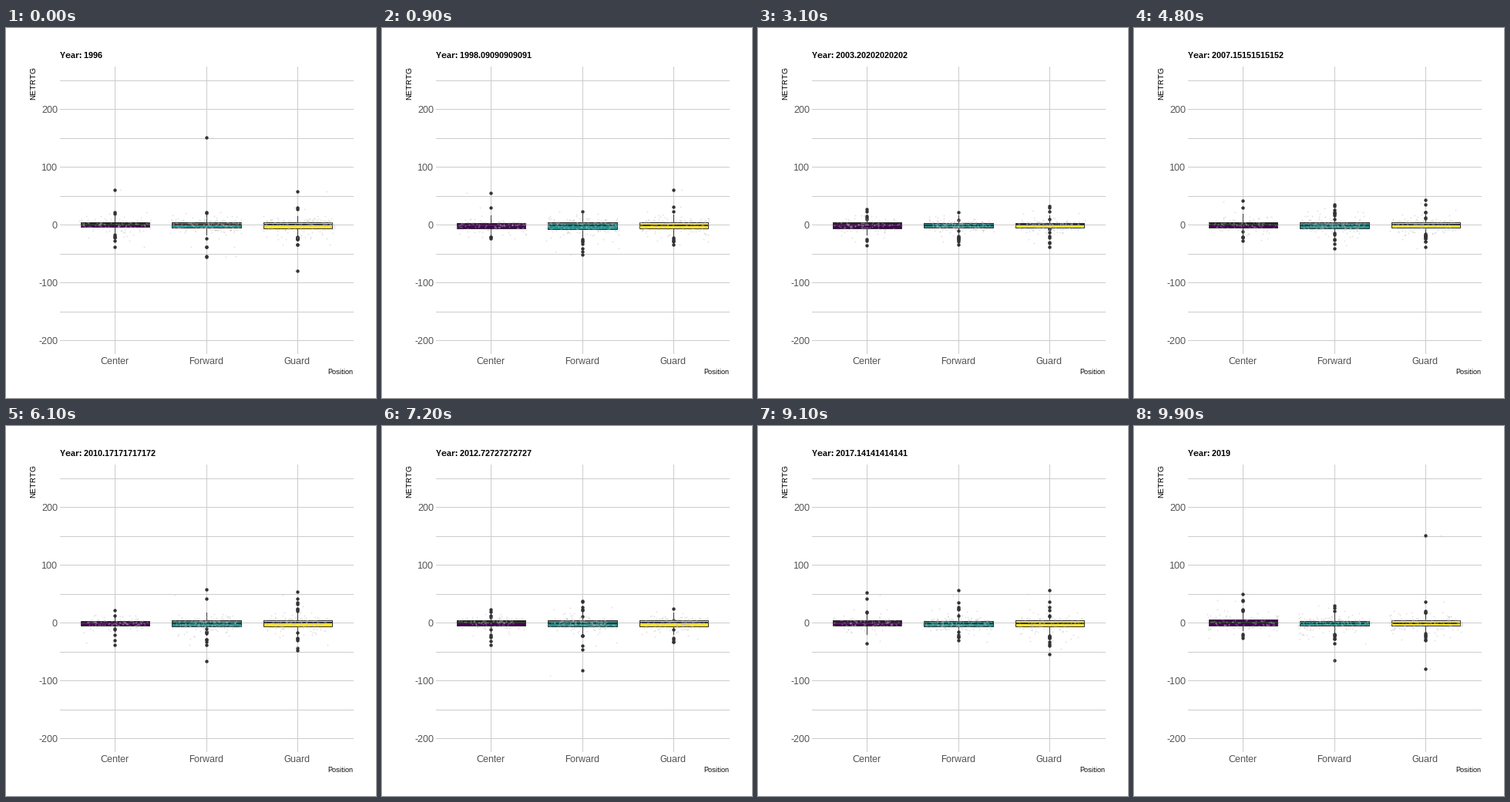
A matplotlib script that plays this animation: 480 px wide and 480 px high, repeating every 10 s.

```python
import numpy as np
import matplotlib.pyplot as plt
from matplotlib.animation import FuncAnimation
from matplotlib.patches import Rectangle

plt.rcParams.update({
    "font.family": "Liberation Sans",
    "text.hinting": "native",
    "text.hinting_factor": 1,
})

FRAMES, FIRST, LAST = 100, 1996, 2019
GROUPS = ["Center", "Forward", "Guard"]
FILLS = ["#440154", "#21908C", "#FDE725"]
COUNTS = [110, 190, 180]
PITCH = 380 / 3.2
CENTERS = [70 + PITCH * (0.6 + g) for g in range(3)]
HALF_BOX, HALF_JITTER = 0.375 * PITCH, 0.4 * PITCH
DARK, GRID = "#333333", "#cccccc"

# Seasons with one extreme rating: (group, rating)
PEAKS = {1996: (1, 151), 1997: (1, -200), 1999: (2, -163), 2005: (0, -147),
         2009: (1, -132), 2013: (1, -124), 2018: (2, -149), 2019: (2, 151)}


def row(rating):
    return 255 - 0.75 * np.asarray(rating, float)


def season(year, group):
    """Five-number summary, outliers and jittered points of one box."""
    rng = np.random.default_rng(year * 10 + group)
    t = rng.standard_t(3, COUNTS[group] + rng.integers(-8, 9))
    ratings = np.clip(-1 + t * np.where(t > 0, 5.8, 7.0), -80, 60)
    if PEAKS.get(year, (None,))[0] == group:
        ratings[0] = PEAKS[year][1]

    q1, mid, q3 = np.percentile(ratings, [25, 50, 75])
    reach = 1.5 * (q3 - q1)
    inside = (ratings >= q1 - reach) & (ratings <= q3 + reach)
    body = ratings[inside]
    stats = np.array([body.max(), q3, mid, q1, body.min()])
    outliers = np.sort(ratings[~inside])[::-1]

    xs = CENTERS[group] + rng.uniform(-HALF_JITTER, HALF_JITTER, len(ratings))
    points = rng.permutation(np.column_stack([xs, ratings]))
    return stats, outliers, points


YEARS = range(FIRST, LAST + 1)
KEYS = [round((y - FIRST) * (FRAMES - 1) / (LAST - FIRST)) for y in YEARS]
DATA = [[season(y, g) for g in range(3)] for y in YEARS]


def tween(frame, group):
    k = int(np.searchsorted(KEYS, frame, side="right")) - 1
    start = DATA[k][group]
    if KEYS[k] == frame:
        return start
    end = DATA[k + 1][group]
    t = (frame - KEYS[k]) / (KEYS[k + 1] - KEYS[k])
    size = max(len(start[1]), len(end[1]))
    paired = min(len(start[2]), len(end[2]))

    def mix(a, b):
        return a + (b - a) * t

    return (mix(start[0], end[0]),
            mix(np.resize(start[1], size), np.resize(end[1], size)),
            mix(start[2][:paired], end[2][:paired]))


fig = plt.figure(figsize=(480 / 72, 480 / 72), dpi=72, facecolor="white")
ax = fig.add_axes([0, 0, 1, 1])
ax.set(xlim=(0, 480), ylim=(480, 0))
ax.axis("off")


def line(xs, ys, color, width=1, z=1):
    return ax.plot(xs, ys, color=color, lw=width, zorder=z, antialiased=False,
                   solid_capstyle="butt")[0]


def label(x, y, text, size, **style):
    return ax.text(x, y, text, size=size, va="baseline", **style)


for rating in range(-200, 251, 50):
    y = row(rating)
    line([70, 450], [y, y], GRID)
    if rating % 100 == 0:
        label(67, y + 5, str(rating), 12, color="#4d4d4d", ha="right")
for name, x in zip(GROUPS, CENTERS):
    x = int(x)
    line([x, x], [50, 422], GRID)
    label(x - 0.5, 436, name, 12, color="#4d4d4d", ha="center")

label(450, 449, "Position", 9, ha="right")
label(38, 50, "NETRTG", 9.6, ha="right", rotation=90, rotation_mode="anchor")
title = label(70, 39, "", 11, weight="bold")


class Box:
    def __init__(self, group):
        x = int(CENTERS[group])
        left, right = CENTERS[group] - HALF_BOX, CENTERS[group] + HALF_BOX
        self.group, self.x = group, x
        self.dots = ax.plot([], [], "o", ms=4.4, mew=0, color=DARK,
                            zorder=2)[0]
        self.whiskers = [line([x, x], [0, 0], DARK, z=3) for _ in range(2)]
        self.body = ax.add_patch(Rectangle(
            (left, 0), right - left, 1, fc=FILLS[group], ec=DARK, lw=1,
            zorder=4, snap=True))
        self.median = line([left, right], [0, 0], DARK, 2, z=5)
        self.jitter = ax.plot([], [], "o", ms=2, mew=0, color="#bebebe",
                              alpha=0.4, zorder=6)[0]

    def update(self, frame):
        stats, outliers, points = tween(frame, self.group)
        high, top, mid, bottom, low = row(stats)
        self.body.set_y(top)
        self.body.set_height(bottom - top)
        self.median.set_ydata([mid, mid])
        self.whiskers[0].set_ydata([high, top])
        self.whiskers[1].set_ydata([bottom, low])
        self.dots.set_data(np.full(len(outliers), self.x), row(outliers))
        self.jitter.set_data(points[:, 0], row(points[:, 1]))


boxes = [Box(g) for g in range(3)]


def update(frame):
    year = FIRST + (LAST - FIRST) * frame / (FRAMES - 1)
    title.set_text(f"Year: {year:.15g}")
    for box in boxes:
        box.update(frame)
    return []


anim = FuncAnimation(fig, update, frames=FRAMES, interval=100, repeat=True,
                     repeat_delay=0, blit=False)
plt.show()
```
